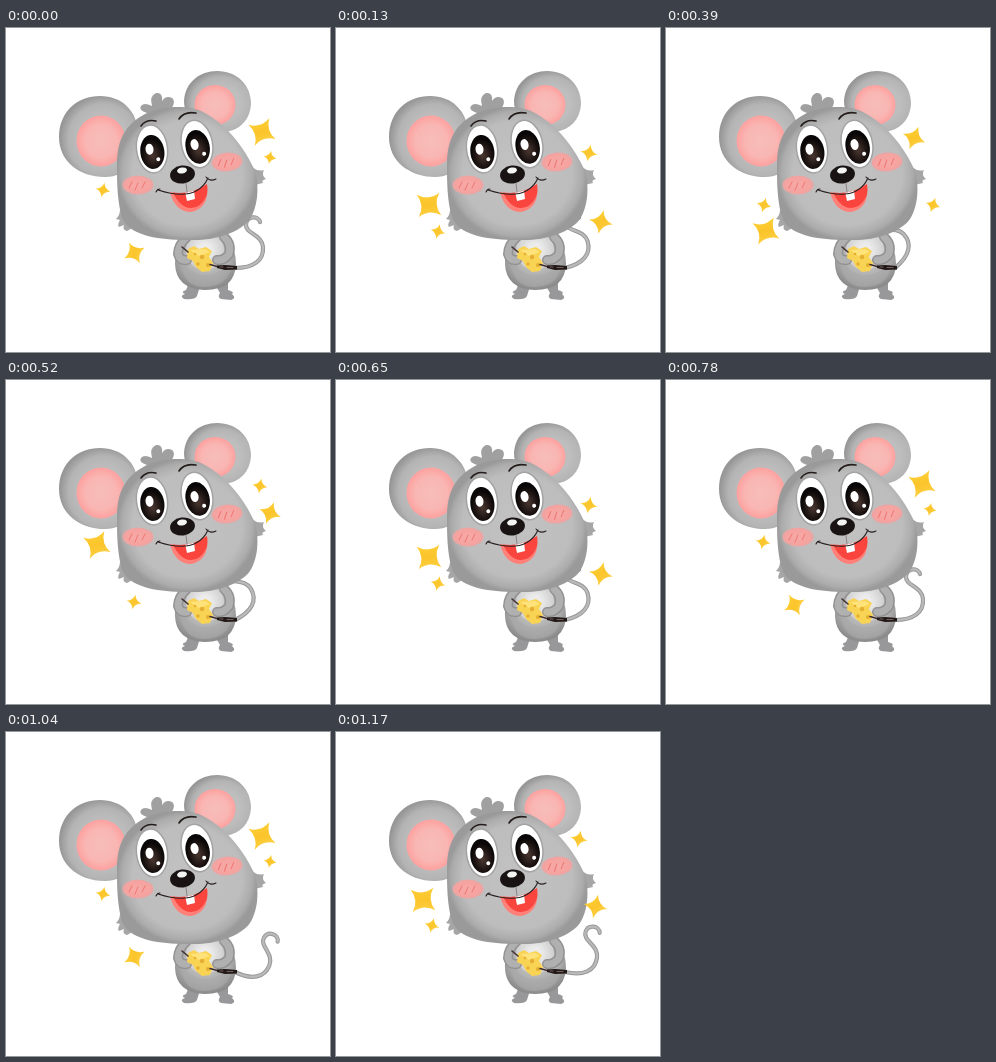
Write an HTML page that moves like this. It is 324 px wide and 324 px high and loops after 1300 ms.

```html
<!DOCTYPE html>
<html lang="en">
<head>
<meta charset="utf-8">
<title>Mouse with cheese</title>
<style>
html, body { margin: 0; width: 100%; height: 100%; overflow: hidden; background: #fff; }
svg { display: block; width: 100vw; height: 100vh; }
</style>
</head>
<body>
<svg viewBox="0 0 324 324" fill="none" stroke-linecap="round" stroke-linejoin="round">
  <defs>
    <radialGradient id="fur">
      <stop offset="0" stop-color="#c2c2c3"/><stop offset=".78" stop-color="#bdbdbe"/>
      <stop offset=".93" stop-color="#acacad"/><stop offset="1" stop-color="#9a9a9b"/>
    </radialGradient>
    <radialGradient id="ear" cx=".56" cy=".54" r=".55">
      <stop offset=".5" stop-color="#bebebf"/><stop offset=".8" stop-color="#b4b4b5"/>
      <stop offset="1" stop-color="#979798"/>
    </radialGradient>
    <radialGradient id="pink">
      <stop offset="0" stop-color="#f7bdba"/><stop offset=".65" stop-color="#f9b6b3"/>
      <stop offset="1" stop-color="#fda19f"/>
    </radialGradient>
    <radialGradient id="blush">
      <stop offset="0" stop-color="#f5aaa7"/><stop offset=".7" stop-color="#f7a3a0"/>
      <stop offset="1" stop-color="#eaa5a3"/>
    </radialGradient>
    <radialGradient id="body" cx=".5" cy=".4" r=".62">
      <stop offset=".2" stop-color="#c5c5c6"/><stop offset=".65" stop-color="#adadae"/>
      <stop offset="1" stop-color="#868687"/>
    </radialGradient>
    <radialGradient id="belly">
      <stop offset=".3" stop-color="#ececec"/><stop offset="1" stop-color="#cfcfd0"/>
    </radialGradient>
    <radialGradient id="iris" cy=".6">
      <stop offset=".1" stop-color="#44322d"/><stop offset=".65" stop-color="#1e1513"/>
      <stop offset="1" stop-color="#080606"/>
    </radialGradient>
    <linearGradient id="gold" x1="0" y1="0" x2="1" y2="1">
      <stop stop-color="#ffd83d"/><stop offset=".5" stop-color="#fbc42b"/>
      <stop offset="1" stop-color="#ffdb55"/>
    </linearGradient>
    <clipPath id="lips"><path d="M164 164Q184 168 201 156Q204 180 185 184Q169 184 164 164Z"/></clipPath>
    <path id="tailLine" d="M229 240C248 240 258 232 257 219C256 206 239 206 240 196C241 188 252 187 254 194"/>
  </defs>

  <g id="tail">
    <use href="#tailLine" stroke="#989899" stroke-width="4.2"/>
    <use href="#tailLine" stroke="#bababb" stroke-width="2.2"/>
  </g>

  <g id="feet" fill="#98989a">
    <path d="M183 255L194 258L191 268Q189 272 178 271Q173 268 179 266Q174 264 180 262Z"/>
    <path d="M210 258L222 254L222 262Q229 264 226 266Q231 270 225 272L215 271Q211 269 214 265Z"/>
  </g>
  <path fill="url(#body)" d="M180 207Q199 201 219 207Q230 219 230 236Q229 262 199 262Q170 261 169 236Q168 219 180 207Z"/>
  <ellipse cx="199" cy="222" rx="19" ry="20" fill="url(#belly)"/>
  <path fill="#a9a9aa" d="M174 229Q175 259 199 259Q225 258 226 232Q217 246 200 247Q183 247 174 229Z" opacity=".65"/>
  <g id="arms">
    <path stroke="#929293" stroke-width="10" d="M181 209Q172 217 172 226Q174 233 181 232M218 209Q226 216 223 226Q218 233 211 232"/>
    <path stroke="#b0b0b1" stroke-width="7" d="M181 209Q172 217 172 226Q174 233 181 232M218 209Q226 216 223 226Q218 233 211 232"/>
  </g>
  <path fill="#f9d354" d="M182 221L188 218L193 221L200 219L206 223L203 229L207 235L204 243L196 244L190 239L187 233L181 230Z"/>
  <path fill="#ffe27a" d="M184 222L199 221L204 224L193 228Z"/>
  <g fill="#e4ae31"><circle cx="196" cy="229" r="2.2"/><circle cx="202" cy="237" r="2"/><circle cx="192" cy="236" r="1.7"/><circle cx="189" cy="226" r="1.3"/></g>
  <path stroke="#43302f" stroke-width="1.6" d="M176 219L182 224M204 236.500L213 239"/>
  <path fill="#201917" d="M211 237.500L219 237L231 238L231 241.500L219 242L211 240Z"/>
  <path stroke="#765d57" d="M214 239H217M221 239.500H227"/>

  <path fill="url(#ear)" d="M53 109C53 83 72 68 94 68C116 68 131 83 132 104C134 130 122 149 99 149C73 149 53 133 53 109Z"/>
  <ellipse cx="95" cy="113" rx="24.5" ry="25.5" fill="url(#pink)"/>
  <path fill="url(#ear)" d="M178 73C179 54 194 43 211 43C231 43 245 57 245 76C244 94 231 104 215 104C195 104 178 92 178 73Z"/>
  <ellipse cx="209" cy="77" rx="20.5" ry="20" fill="url(#pink)"/>

  <path fill="#a0a0a1" d="M141 85Q132 82 135 78Q138 74 146 78Q143 68 150 65Q157 64 156 73Q160 67 166 70Q171 74 163 84Z"/>
  <path fill="#a6a6a7" d="M246 139Q252 144 258 142Q255 147 260 151Q255 152 257 155L244 158ZM114 182Q114 187 110 191L114 192Q111 197 113 199L118 197Q116 202 121 203L132 197Z"/>
  <path fill="url(#fur)" d="M111 136C111 111 120 96 139 86C154 78 182 76 197 84C219 95 238 118 249 143C254 161 251 180 244 191C234 205 208 213 184 212C160 212 131 210 119 195C111 182 111 153 111 136Z"/>

  <path stroke="#241c1a" stroke-width="1.6" d="M135 98Q140 91 150 93M173 91Q178 83 190 85"/>

  <g id="eye" transform="translate(146 121) rotate(-7)">
    <ellipse rx="15.500" ry="24" fill="#fff" stroke="#a3a3a4" stroke-width="1.5"/>
    <ellipse cx="0" cy="3" rx="12" ry="17" fill="url(#iris)"/>
    <ellipse cx="-2.500" cy="0" rx="4" ry="5.500" fill="#fff"/>
    <circle cx="5" cy="11" r="2" fill="#fff"/>
  </g>
  <use href="#eye" transform="translate(191 116) rotate(-5) translate(-146 -121)"/>

  <g id="cheek">
    <ellipse cx="132" cy="157" rx="15.500" ry="9.500" fill="url(#blush)"/>
    <path stroke="#ec7773" d="M123 160L126 154M129 162L132 155M136 160L139 154"/>
  </g>
  <use href="#cheek" transform="translate(221 134) rotate(-5) translate(-132 -157)"/>

  <g clip-path="url(#lips)">
    <path fill="#ff8078" d="M160 150H206V188H160Z"/>
    <path fill="#f9453e" d="M162 150H204Q202 179 185 180Q170 180 162 150Z"/>
    <path fill="#fff" d="M179 163L188 162L189 171L181 173Z"/>
  </g>
  <path stroke="#292020" stroke-width="1.1" d="M152 162Q177 170 190 163Q198 159 202 150M150 164Q151 161 154 161M200 149Q204 154 210 151"/>
  <path stroke="#8d8586" d="M180 155L181 164"/>
  <ellipse cx="176.500" cy="146.500" rx="12.500" ry="9" fill="#191413" transform="rotate(-8 176.500 146.500)"/>
  <ellipse cx="176" cy="142.500" rx="5" ry="3" fill="#f4f4f4" transform="rotate(-10 176 142.500)"/>

  <g id="stars" fill="url(#gold)"></g>
</svg>
<script>
const STEP = 130;
const SWING_ANGLE = 13;
const swings = [0, -1, -2, -3, -2, -1, 0, 1, 2, 1];
const get = id => document.getElementById(id);

// Each star is [x, y, radius, rotation].
const high = [[256, 104, 15.5, 28], [264, 129.5, 6.5, 10], [97, 162, 7.5, 12], [128.5, 225, 11.5, -28]];
const starsBySwing = {
  "2": high,
  "1": [[87, 168, 16, 40], [96, 193.5, 7.5, 15], [243, 107, 8.5, 12], [259.5, 174.5, 12, 12]],
  "0": high,
  "-1": [[93, 177, 16, 40], [102, 203.5, 7.5, 15], [253, 125, 8.5, 12], [265, 194, 12, 12]],
  "-2": [[91, 165, 15.5, 28], [128, 222, 7.5, 12], [254, 106, 7.5, 10], [264, 133, 11.5, 20]],
  "-3": [[100, 203, 15.5, 30], [98, 177, 7.5, 15], [248, 110, 12, 22], [267, 177, 7.5, 18]]
};

function starPath(r) {
  const c = r * 0.18;
  return `M0 ${-r}Q${c} ${-c} ${r} 0Q${c} ${c} 0 ${r}Q${-c} ${c} ${-r} 0Q${-c} ${-c} 0 ${-r}Z`;
}

function draw(time) {
  const swing = swings[Math.floor(time / STEP) % swings.length];
  get("tail").setAttribute("transform", `rotate(${swing * SWING_ANGLE} 229 240)`);
  get("stars").innerHTML = starsBySwing[swing].map(([x, y, r, angle]) =>
    `<path transform="translate(${x} ${y}) rotate(${angle})" d="${starPath(r)}"/>`).join("");
}

let start;
function tick(now) {
  start ??= now;
  draw(now - start);
  requestAnimationFrame(tick);
}
draw(0);
requestAnimationFrame(tick);
</script>
</body>
</html>
```
